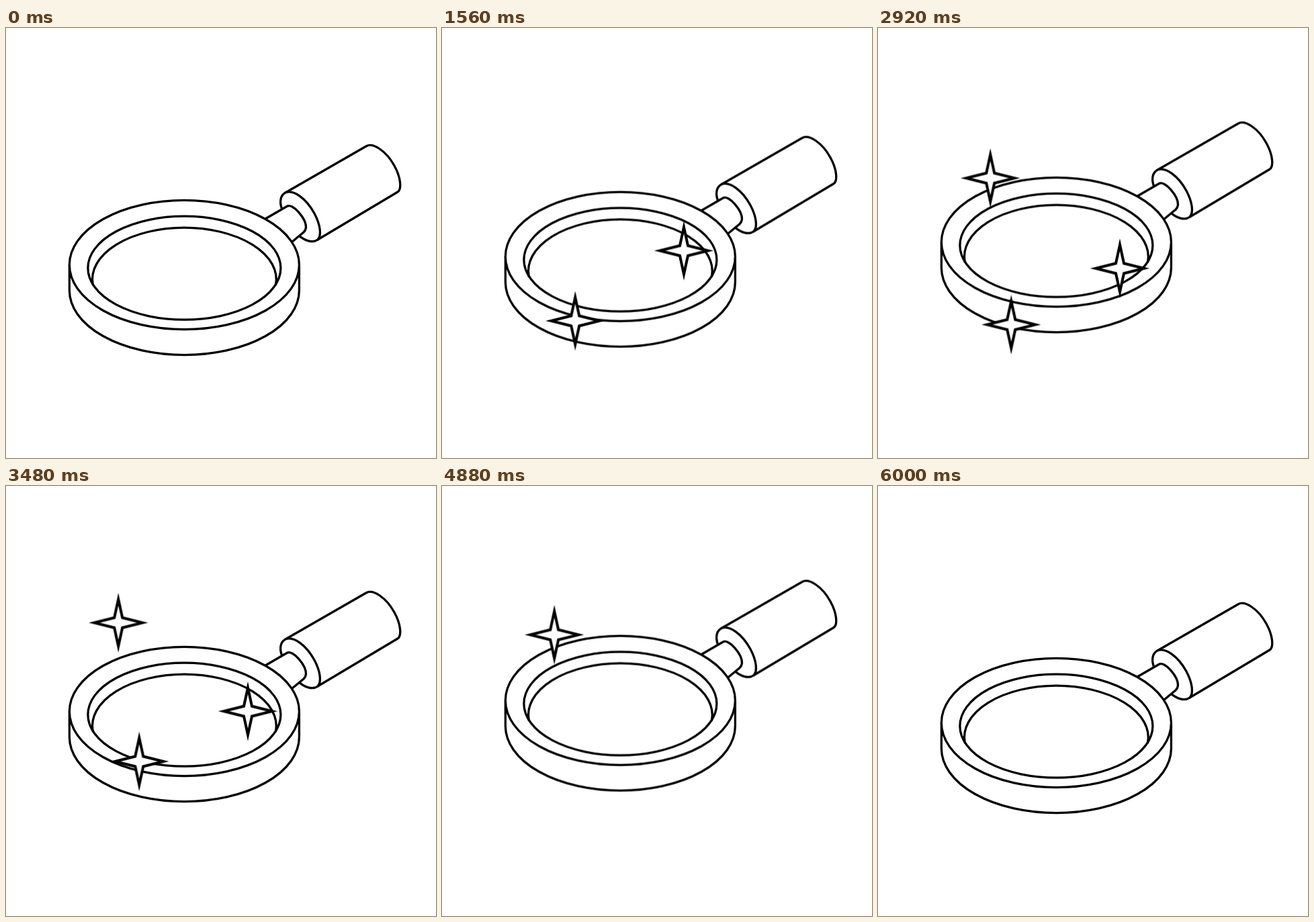
Write an HTML page without scripts that moves like this. It is 640 px wide and 640 px high and loops after 6040 ms.

```html
<!DOCTYPE html>
<html lang="en">
<head>
<meta charset="utf-8">
<title>Magnifying glass</title>
<style>
  html, body { margin: 0; width: 100%; height: 100%; overflow: hidden; background: #fff; }
  svg { display: block; width: 100vw; height: 100vh; }
  .glass, .star { fill: #fff; stroke: #000; }
  .glass { stroke-width: 3.3; stroke-linejoin: round; stroke-linecap: round; }
  .star { stroke-width: 4; stroke-miterlimit: 10; }

  .glass, .float { animation: 6.04s ease-in-out -20ms infinite; }
  .glass { animation-name: bob; }
  .one .float { animation-name: float-one; }
  .two .float { animation-name: float-two; }
  .three .float { animation-name: float-three; }

  .star { animation: pop 6.04s linear calc(var(--start) - 20ms) infinite backwards; }
  .one { --start: 20ms; }
  .two { --start: 800ms; }
  .three { --start: 1600ms; }

  @keyframes bob {
    0%, 33.113%, 66.225%, 99.338%, 100% { transform: translateY(0); }
    16.556%, 49.669%, 82.781% { transform: translateY(-34px); }
  }
  @keyframes float-one {
    0%, 22.67%, 48.86%, 74.5%, 100% { transform: translateY(38px); }
    8.66%, 35.76%, 61.59%, 87.5% { transform: translateY(0); }
  }
  @keyframes float-two {
    0%, 33.33%, 65.94%, 100% { transform: translateY(-44px); }
    17.02%, 49.64%, 82.25% { transform: translateY(0); }
  }
  @keyframes float-three {
    0%, 46.85%, 84.93% { transform: translateY(32px); }
    27.8%, 65.9%, 100% { transform: translateY(0); }
  }
  @keyframes pop {
    0%, 66.225%, 100% { transform: scale(0); opacity: 0; }
    8.278%, 57.947% { transform: scale(1); opacity: 1; }
  }
</style>
</head>
<body>
<svg viewBox="0 0 640 640">
  <defs>
    <path id="spark" d="M0-35 6-7.5 36 0 6 7.5 0 35-6 7.5-36 0-6-7.5Z"/>
  </defs>

  <g class="glass">
    <!-- handle -->
    <path d="M416 245 536 176C546 170 566 183 578 205C588 223 589 240 583 244L464 315Z"/>
    <path d="M416 245C428 240 447 254 459 276C468 293 470 309 464 315C456 321 444 316 436 309L410.500 269C406 256 410 248 416 245Z"/>
    <path d="M380 287.500 418 265.500C427 260 447 284 446.500 297Q446 301 443 304L420 323"/>
    <!-- ring -->
    <path d="M94.400 352.500V390.600A171 96.100 0 0 0 436.400 390.600V352.500"/>
    <ellipse cx="265.400" cy="352.500" rx="171" ry="96.100"/>
    <ellipse cx="265.400" cy="357.200" rx="143.500" ry="77"/>
    <path d="M129.200 382A136.900 77 0 1 1 401.600 382" fill="none"/>
  </g>

  <g class="one" transform="translate(198.300 403.500)"><g class="float"><use class="star" href="#spark"/></g></g>
  <g class="two" transform="translate(360 358)"><g class="float"><use class="star" href="#spark"/></g></g>
  <g class="three" transform="translate(167.200 192)"><g class="float"><use class="star" href="#spark"/></g></g>
</svg>
</body>
</html>
```
